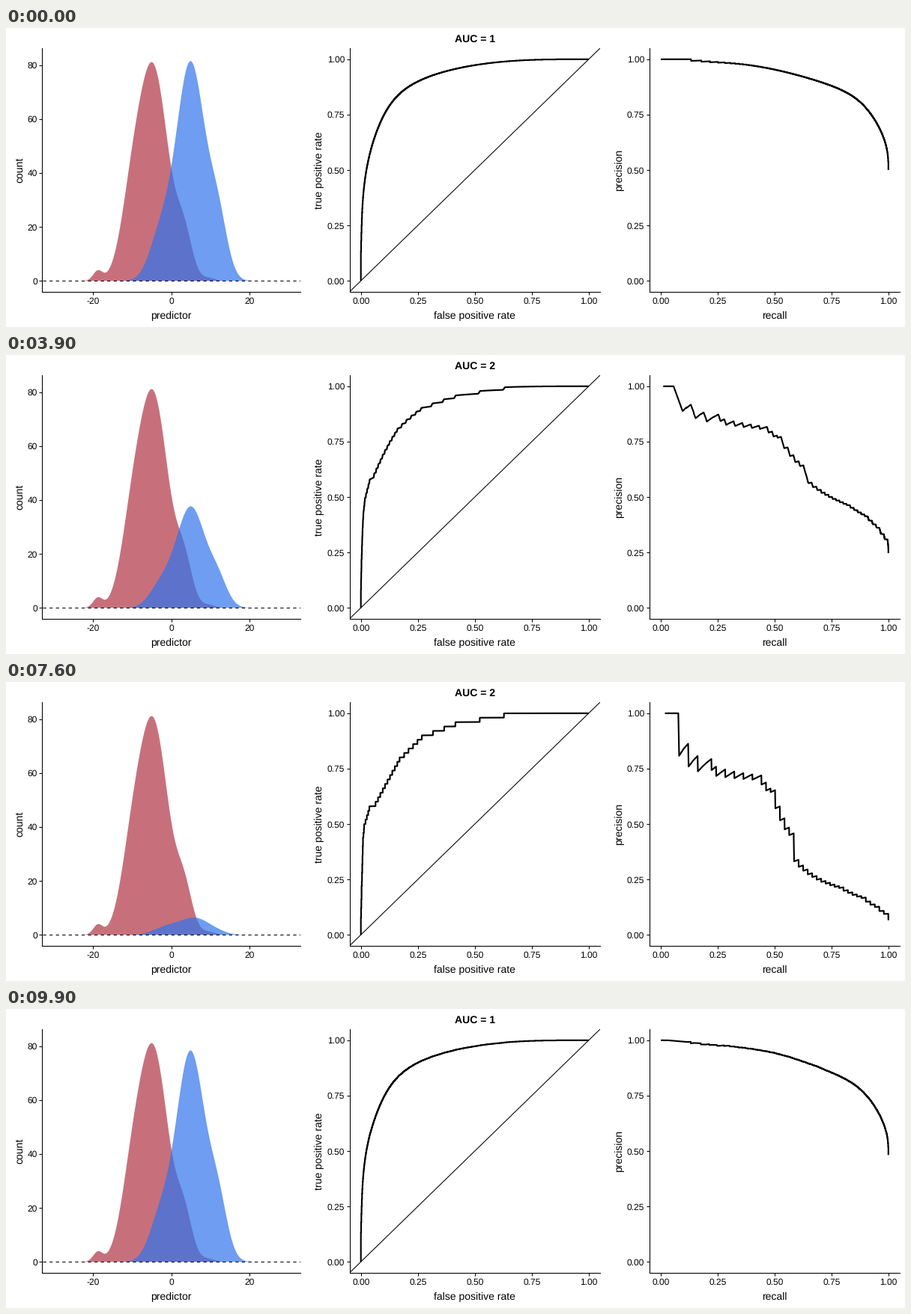
Recreate the animation shown at these times as a matplotlib script. Size 1200x400 px, loop 10 s.

```python
import numpy as np
import matplotlib.pyplot as plt
from matplotlib.animation import FuncAnimation

W, H, DPI = 1200, 400, 100
PX = 72 / DPI  # points per pixel
THIN, THICK = 1.07 * PX, 2.13 * PX
STEPS = 25  # length of a transition and of a hold
FRAMES, INTERVAL = 4 * STEPS, 100
NEG = POS = 1000

plt.rcParams.update({
    "font.family": "Liberation Sans",
    "text.hinting": "none",
    "axes.linewidth": THIN,
})


def bumps(x, *parts):
    """Sum of bell curves given as (height, centre, width)."""
    return sum(h * np.exp(-((x - m) / s) ** 2 / 2) for h, m, s in parts)


score = np.linspace(-33, 33, 661)
red = bumps(score, (77, -4.5, 3.75), (24, -10.2, 2.9), (15, 3.3, 2.1),
            (3.6, -18.8, 1.2), (1, 9.5, 1.6))
blue_many = bumps(score, (81, 4.9, 3.75), (14.5, -3, 2.8), (19.5, 12, 2.4))
blue_few = bumps(score, (3.2, 7.2, 3.2), (2.4, -.5, 3.4))


def tail(density):
    """Share of cases above each score, from high to low scores."""
    total = np.cumsum(density[::-1])
    return total / total[-1]


def curves(above):
    """ROC and precision-recall paths; above = negatives ahead of each positive."""
    rank = np.concatenate([above + .5, np.arange(1, NEG + 1)])
    hit = np.argsort(rank, kind="stable") < len(above)
    tp, fp = np.cumsum(hit), np.cumsum(~hit)
    tpr = tp / len(above)
    roc = np.array([np.r_[0, fp / NEG], np.r_[0, tpr]])
    return roc, np.array([tpr, tp / (tp + fp)])


def spread(path, count):
    """Split the longest pieces until the path has count points."""
    seg = np.hypot(*np.diff(path))
    parts = np.ones(len(seg), int)
    for _ in range(count - path.shape[1]):
        parts[np.argmax(seg / parts)] += 1
    at = np.concatenate([i + np.arange(n) / n for i, n in enumerate(parts)])
    at = np.r_[at, len(seg)]
    return np.array([np.interp(at, np.arange(path.shape[1]), p) for p in path])


many_above = np.floor(np.interp((np.arange(POS) + .5) / POS,
                                tail(blue_many), NEG * tail(red)))
few_above = np.ceil(np.interp(np.arange(1, 51),
                              [4, 11, 22, 25, 29, 30, 34, 40, 45, 48, 50],
                              [0, 3, 9, 14, 37, 65, 107, 171, 268, 415, 628]))
many_paths = curves(many_above)
few_paths = [spread(few, many.shape[1])
             for few, many in zip(curves(few_above), many_paths)]

fig = plt.figure(figsize=(W / DPI, H / DPI), dpi=DPI, facecolor="white")


def label(x, y, text, size=12, **kw):
    kw = {"ha": "center", "va": "baseline", **kw}
    return fig.text(x / W, 1 - y / H, text, size=size * PX, color="black",
                    rotation_mode="anchor", **kw)


def panel(left, right, xlim, ylim, xticks, yticks, fmt, xname, yname):
    top, bottom = 27, 353
    ax = fig.add_axes([left / W, 1 - bottom / H, (right - left) / W,
                       (bottom - top) / H], facecolor="none")
    ax.set(xlim=xlim, ylim=ylim, xticks=xticks, yticks=yticks)
    ax.spines[["top", "right"]].set_visible(False)
    ax.tick_params(length=3.7 * PX, width=THIN, labelleft=False,
                   labelbottom=False)
    for v in xticks:
        x = left + (v - xlim[0]) / (xlim[1] - xlim[0]) * (right - left)
        label(x, 369.3, fmt % v)
    for v in yticks:
        y = bottom - (v - ylim[0]) / (ylim[1] - ylim[0]) * (bottom - top)
        label(left - 6.3, y + 4.4, fmt % v, ha="right")
    label((left + right) / 2, 388.8, xname, 14)
    label(left // 400 * 400 + 22, (top + bottom) / 2, yname, 14, rotation=90)
    return ax


UNIT, QUARTERS = (-.05, 1.05), np.linspace(0, 1, 5)
hist = panel(48.5, 393, (-33, 33), (-4.11, 86.3), [-20, 0, 20],
             range(0, 81, 20), "%d", "predictor", "count")
roc_ax = panel(458.5, 793, UNIT, UNIT, QUARTERS, QUARTERS, "%.2f",
               "false positive rate", "true positive rate")
pr_ax = panel(858.5, 1193, UNIT, UNIT, QUARTERS, QUARTERS, "%.2f",
              "recall", "precision")
title = label(626, 19, "", 14, weight="bold")

hist.fill(score, red, color="#b03444", alpha=.7, lw=0)
blue, = hist.fill(score, blue_many, color="#3074ec", alpha=.7, lw=0)
hist.plot([-33, 33], [0, 0], color="black", lw=THIN, dashes=(4, 4))

roc_ax.plot(UNIT, UNIT, color="black", lw=THIN)
lines = [ax.plot([], [], color="black", lw=THICK, solid_capstyle="butt")[0]
         for ax in (roc_ax, pr_ax)]


def draw(i):
    # hold, shrink, hold, grow back
    t = np.clip(i / STEPS - 1, 0, 1) - np.clip(i / STEPS - 3, 0, 1)
    height = (1 - t) * blue_many + t * blue_few
    blue.set_xy(np.column_stack([score, height]))
    for line, many, few in zip(lines, many_paths, few_paths):
        line.set_data(*((1 - t) * many + t * few))
    title.set_text("AUC = %d" % (1 if t < .5 else 2))
    return [blue, title, *lines]


anim = FuncAnimation(fig, draw, frames=FRAMES, interval=INTERVAL, repeat=True,
                     repeat_delay=0)
plt.show()
```
